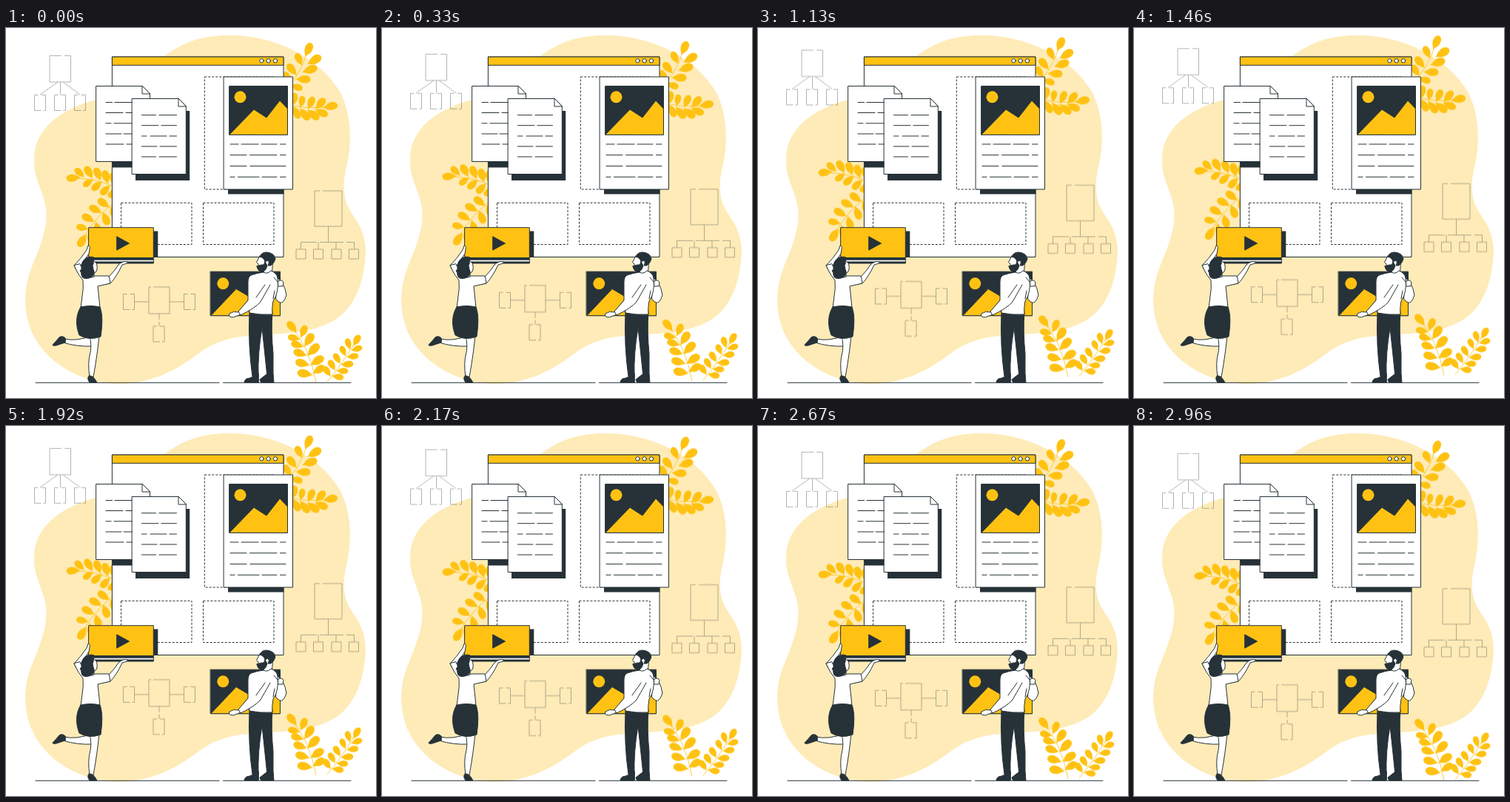
Recreate the animation shown at these times as an HTML page without scripts. Size 500 by 500 pixels, loop 3000 ms.

```html
<!DOCTYPE html>
<html lang="en">
<head>
<meta charset="utf-8">
<title>Building a page</title>
<style>
html, body { margin: 0; width: 100%; height: 100%; overflow: hidden; background: #fff; }
svg { display: block; width: 100vw; height: 100vh; }
.float { animation: float 3s linear infinite; }
@keyframes float { 50% { transform: translateY(-10px); } }
.ink { stroke: #263238; stroke-width: 1; stroke-linejoin: round; stroke-linecap: round; }
.dark { fill: #263238; }
.gold { fill: #ffc213; }
.white { fill: #fff; }
.line { fill: none; }
.stem { fill: none; stroke: #ffc213; stroke-width: .8; }
.dash { fill: none; stroke: #263238; stroke-dasharray: 3 2; }
.chart { fill: none; stroke: #263238; stroke-width: .9; opacity: .4; }
</style>
</head>
<body>
<svg viewBox="0 0 500 500">
<defs>
  <path id="leaf" d="M0 0C-1-4-5.500-7-5.500-13C-5.500-18-3-20.500 0-20.500C4-20 5.500-16 5-11C4.500-6 1-4 0 0Z"/>
  <path id="node" d="M9 0H15V21H12M9 21H0V0H5"/>
  <path id="mini" d="M0 0H13V13H0Z"/>
</defs>

<path fill="#feebb7" d="M305 10C363 10 424 40 451 86C468 118 467 157 461 184C455 207 455 228 463 243C470 257 486 270 486 303C484 338 476 368 452 389C428 408 396 412 357 414C309 416 285 421 260 440C230 463 195 481 150 481C104 480 58 455 38 417C22 386 23 350 36 320C49 289 56 268 54 246C52 220 36 205 38 174C40 138 70 111 121 97C164 88 184 60 213 39C241 17 271 9 305 10Z"/>

<g class="float">
  <g class="chart">
    <path d="M79 37.500H87.500V73H59V37.500H75M73.500 73V90M70 73L46 90M77 73L100 90"/>
    <use href="#node" x="38.500" y="90.500"/><use href="#node" x="65.500" y="90.500"/><use href="#node" x="92.500" y="90.500"/>
    <path d="M428 220H454V268H417V220H424M435.500 268V289.500M398.500 299V289.500H420M424 289.500H456M460 289.500H470.500V299M422 289.500V299M446 289.500V299"/>
    <use href="#mini" x="392" y="299"/><use href="#mini" x="415.500" y="299"/><use href="#mini" x="440" y="299"/><use href="#mini" x="463.500" y="299"/>
    <path d="M199 350H221V386H193V350H196M174 370H193M221 370H240M207 386V394M207 397V403"/>
    <use href="#node" x="158.500" y="359.500"/><use href="#node" x="240.500" y="359.500"/><use href="#node" x="199" y="403"/>
  </g>

  <path class="stem" d="M370 89Q396 70 408 30M370 99Q400 113 444 105M155 219Q125 202 86 203M155 231Q124 248 102 288M419 479Q410 430 384 402M434 478Q456 452 475 419"/>
  <g class="gold">
    <use href="#leaf" transform="translate(400 51)rotate(-24)scale(.9)"/>
    <use href="#leaf" transform="translate(393 64)rotate(-39)scale(.95)"/>
    <use href="#leaf" transform="translate(386 75)rotate(-35)scale(.9)"/>
    <use href="#leaf" transform="translate(404 39)rotate(25)"/>
    <use href="#leaf" transform="translate(407 49)rotate(61)scale(1.05)"/>
    <use href="#leaf" transform="translate(400 60)rotate(72)scale(1.05)"/>
    <use href="#leaf" transform="translate(391 69)rotate(92)"/>
    <use href="#leaf" transform="translate(384 77)rotate(108)scale(.85)"/>
  </g>
  <g class="gold">
    <use href="#leaf" transform="translate(389 105)rotate(5)scale(.85)"/>
    <use href="#leaf" transform="translate(398 108)rotate(12)scale(.8)"/>
    <use href="#leaf" transform="translate(408 110)rotate(25)scale(.9)"/>
    <use href="#leaf" transform="translate(418 110)rotate(42)scale(.95)"/>
    <use href="#leaf" transform="translate(428 108)rotate(79)"/>
    <use href="#leaf" transform="translate(388 105)rotate(155)scale(.93)"/>
    <use href="#leaf" transform="translate(397 108)rotate(143)"/>
    <use href="#leaf" transform="translate(407 110)rotate(131)"/>
    <use href="#leaf" transform="translate(417 110)rotate(115)scale(.95)"/>
  </g>
  <g class="gold">
    <use href="#leaf" transform="translate(106 202)rotate(-45)scale(.85)"/>
    <use href="#leaf" transform="translate(117 204)rotate(-28)scale(.95)"/>
    <use href="#leaf" transform="translate(128 207)rotate(-21)scale(.95)"/>
    <use href="#leaf" transform="translate(138 211)rotate(-15)scale(.95)"/>
    <use href="#leaf" transform="translate(148 215)rotate(-11)"/>
    <use href="#leaf" transform="translate(101 202)rotate(-93)scale(.95)"/>
    <use href="#leaf" transform="translate(118 204)rotate(-125)scale(.8)"/>
    <use href="#leaf" transform="translate(130 207)rotate(-130)scale(.9)"/>
    <use href="#leaf" transform="translate(141 212)rotate(-135)scale(.9)"/>
    <use href="#leaf" transform="translate(150 217)rotate(-135)scale(.8)"/>
  </g>
  <g class="gold">
    <use href="#leaf" transform="translate(109 278)rotate(-147)"/>
    <use href="#leaf" transform="translate(112 272)rotate(-76)scale(.85)"/>
    <use href="#leaf" transform="translate(120 262)rotate(-61)scale(.95)"/>
    <use href="#leaf" transform="translate(130 250)rotate(-62)scale(.95)"/>
    <use href="#leaf" transform="translate(140 243)rotate(-52)scale(.95)"/>
    <use href="#leaf" transform="translate(113 273)rotate(173)scale(.85)"/>
    <use href="#leaf" transform="translate(121 261)rotate(165)scale(.95)"/>
    <use href="#leaf" transform="translate(131 248)rotate(160)scale(.95)"/>
    <use href="#leaf" transform="translate(141 241)rotate(155)scale(.9)"/>
  </g>
  <g class="gold">
    <use href="#leaf" transform="translate(393 412)rotate(-38)scale(.95)"/>
    <use href="#leaf" transform="translate(398 421)rotate(-76)scale(.85)"/>
    <use href="#leaf" transform="translate(403 431)rotate(-72)scale(.9)"/>
    <use href="#leaf" transform="translate(407 443)rotate(-70)scale(.95)"/>
    <use href="#leaf" transform="translate(411 456)rotate(-74)"/>
    <use href="#leaf" transform="translate(415 469)rotate(-79)scale(1.05)"/>
    <use href="#leaf" transform="translate(398 419)rotate(24)scale(.9)"/>
    <use href="#leaf" transform="translate(403 431)rotate(34)scale(1.05)"/>
    <use href="#leaf" transform="translate(407 443)rotate(46)scale(1.08)"/>
    <use href="#leaf" transform="translate(411 456)rotate(58)scale(1.05)"/>
    <use href="#leaf" transform="translate(414 467)rotate(60)scale(.95)"/>
  </g>
  <g class="gold">
    <use href="#leaf" transform="translate(469 430)rotate(31)scale(.85)"/>
    <use href="#leaf" transform="translate(465 435)rotate(-15)scale(.78)"/>
    <use href="#leaf" transform="translate(459 444)rotate(-23)scale(.76)"/>
    <use href="#leaf" transform="translate(452 454)rotate(-30)scale(.8)"/>
    <use href="#leaf" transform="translate(445 463)rotate(-30)scale(.8)"/>
    <use href="#leaf" transform="translate(439 471)rotate(-35)scale(.8)"/>
    <use href="#leaf" transform="translate(466 436)rotate(74)scale(.78)"/>
    <use href="#leaf" transform="translate(460 445)rotate(83)scale(.8)"/>
    <use href="#leaf" transform="translate(452 455)rotate(87)scale(.85)"/>
    <use href="#leaf" transform="translate(446 463)rotate(93)scale(.8)"/>
    <use href="#leaf" transform="translate(440 470)rotate(100)scale(.8)"/>
  </g>
</g>

<!-- browser window -->
<g class="ink">
  <path class="white" d="M143.800 39H375V309.500H143.800Z"/>
  <path class="gold" d="M143.800 39H375V50.300H143.800Z"/>
  <g class="white"><circle cx="345.500" cy="44.300" r="2.700"/><circle cx="354.700" cy="44.300" r="2.700"/><circle cx="364" cy="44.300" r="2.700"/></g>
</g>
<path class="dash" d="M268.300 66H362V218H268.300ZM155.500 236.300H251V292.500H155.500ZM266.500 236.300H362V292.500H266.500Z"/>

<!-- documents -->
<path class="dark" d="M143.500 175H199V188.500H143.500Z"/>
<g class="ink">
  <path class="white" d="M122 78.500H184L194.500 89V180.500H122Z"/>
  <path class="white" d="M184 78.500V89H194.500Z"/>
  <path class="line" d="M135 100.500H143.500M147 100.500H171M135 114.500H158M162 114.500H171M135 128.800H142M146 128.800H171M135 143H156M159 143H171M135 157H159M163 157H171"/>
</g>
<path class="dark" d="M175 112H248.200V206H175Z"/>
<g class="ink">
  <path class="white" d="M170.500 95.500H233L243.300 106V197.500H170.500Z"/>
  <path class="white" d="M233 95.500V106H243.300Z"/>
  <path class="line" d="M183.500 117.700H202.500M207 117.700H230.500M183.500 131.700H206M210 131.700H230.500M183.500 146H190M195 146H217M221 146H230.500M183.500 160H204M208 160H230.500M183.500 174H202.500M207 174H230.500"/>
</g>

<!-- article card -->
<path class="dark" d="M300 210H375.500V224.500H300Z"/>
<g class="ink">
  <path class="white" d="M294.500 66H387.500V218H294.500Z"/>
  <path class="dark" d="M302 78.500H380.500V144H302Z"/>
  <path class="gold" d="M302 144L335 110L352 121L370 98L380.500 109V144Z"/>
  <path class="line" d="M303 157H314M318 157H341M345 157H366M370.500 157H378M303 171.700H325M329.500 171.700H366M370.500 171.700H378M303 186.600H325M330 186.600H378M303 201.300H309M313.500 201.300H342M346 201.300H366M370.500 201.300H378"/>
</g>
<circle class="gold" cx="316.500" cy="93.300" r="8"/>

<!-- video card -->
<path class="dark" d="M190 274.500H205.300V310H190Z"/>
<g class="ink">
  <path class="gold" d="M112 269.700H199.300V310.500H112Z"/>
  <path class="dark" d="M112 310.500H199.300V318H112Z"/>
  <path class="dark" d="M150 282L166.500 291L150 300Z"/>
</g>
<path stroke="#fff" stroke-width="1.800" d="M113 314.700H199"/>

<!-- picture card -->
<g class="ink">
  <path class="dark" d="M276.500 329.200H370.500V388.500H276.500Z"/>
  <path class="gold" d="M277 388.500L311 352.500L327 362L346 340L370.500 366V388.500Z"/>
</g>
<circle class="gold" cx="293.300" cy="345.300" r="8"/>

<path class="ink line" d="M40 479.300H288M293.500 479.300H466"/>

<!-- woman -->
<g class="ink">
  <path class="white" d="M116 416Q95 424 78 420L77 425Q96 431 117 430Z"/>
  <path class="dark" d="M80 419Q76 415 72 418Q68 423 63 428Q63 430 68 429L80 425Z"/>
  <path class="white" d="M113 416Q116 428 114 438Q110 452 113 472H118Q124 438 126 415Z"/>
  <path class="dark" d="M112 470Q109 474 113 479H123Q121 475 117 471Z"/>
  <path class="white" d="M105 340Q95 329 92 321Q101 312 109 300L111 294Q114 294 113 299L112 305Q106 314 101 321L112 337Z"/>
  <path class="white" d="M123 336L139 336Q147 328 152 320Q158 314 165 316Q163 319 157 320Q149 337 141 345L126 348Z"/>
  <path class="white" d="M92 321Q97 333 104 341Q105 352 103 362Q102 371 101 378H127L124 349L141 345Q140 339 139 335L121 335Q112 337 107 334L100 319Z"/>
  <path class="white" d="M113 314Q122 314 123 321Q124 330 119 331L119 336Q114 339 110 334Z"/>
  <path class="dark" d="M102 321C103 312 111 307 119 310Q121 312 118 315Q119 318 117 321Q118 327 119 329Q120 336 112 338Q103 340 102 334Q102 330 100 328Q103 326 102 321Z"/>
  <path class="dark" d="M101 377Q114 374 127 377C131 388 130 402 128 417Q112 423 99 415C94 402 94 388 101 377Z"/>
</g>

<!-- man -->
<g class="ink">
  <path class="dark" d="M341 467Q332 473 325 474Q322 476 322 479H341ZM352 468L343 475Q343 477 345 479H362L361 468Z"/>
  <path class="dark" d="M329 383H360Q358 410 361 440V472H353Q350 442 346 405Q340 440 341 471H333Q327 430 329 383Z"/>
  <path class="white" d="M365 337Q376 342 379 361Q375 373 370 371L365 367Z"/>
  <path class="white" d="M368 342Q373 339 375 344L374 349L368 349Z"/>
  <path class="white" d="M343 308L338.500 316.500L341 319L341 327L349 330V335H359L361 312Z"/>
  <path class="white" d="M331 334Q340 331 348 330Q353 333 358 328Q366 331 367 338Q369 358 361 369Q359 379 360 387Q343 388 329 385L327 342Q328 335 331 334Z"/>
  <path class="white" d="M330 364L314 384Q307 382 302 386Q300 391 307 391L315 388L334 377Z"/>
  <path class="white" d="M327 342L327 368L314 383L317 388Q336 379 344 370L357 347"/>
  <path class="line" d="M350 347L338 364M362 337L367 343M363 355L361 366"/>
  <path class="dark" d="M343 309Q345 303 352 303Q363 304 364 312Q363 317 358 321L354 321Q357 315 353 314L350 317Q350 311 343 309Z"/>
  <path class="dark" d="M339 322L345 320Q349 321 350 316L353 321Q352 327 347 330Q340 329 339 322Z"/>
</g>
</svg>
</body>
</html>
```
